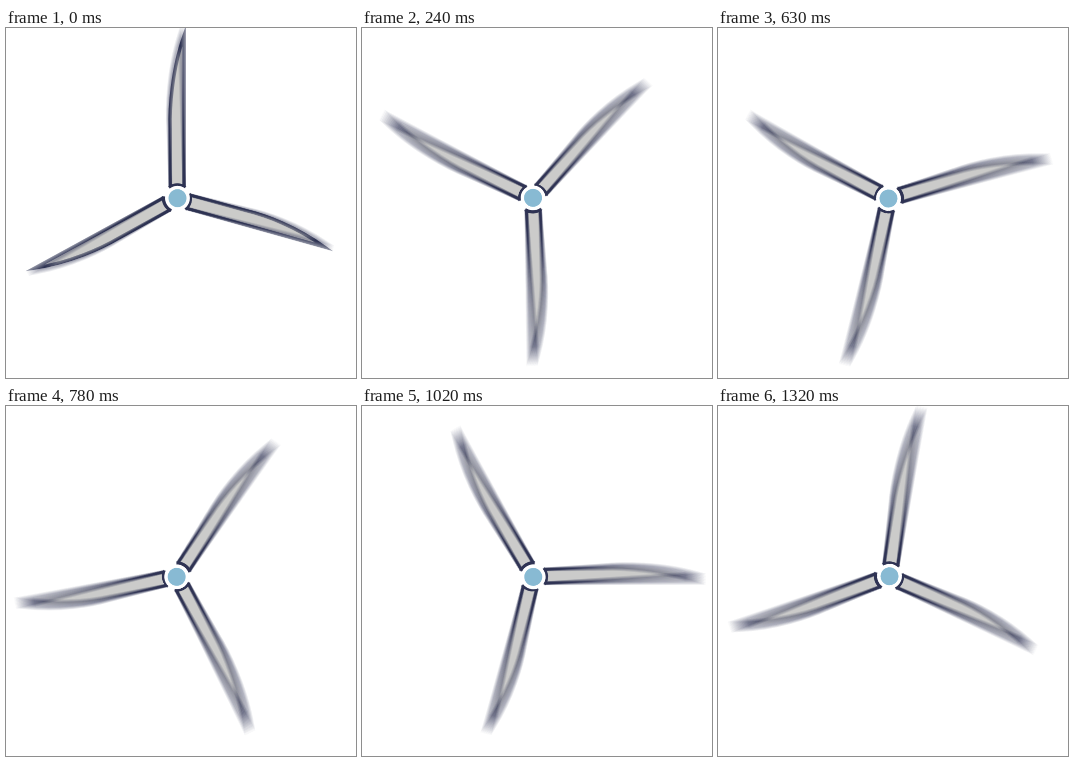
Recreate the animation shown at these times as an HTML page with a canvas. Size 350 px wide and 350 px high, loop 1350 ms.

```html
<!DOCTYPE html>
<html lang="en">
<head>
<meta charset="utf-8">
<title>Spinning rotor</title>
<style>
  html, body { margin: 0; width: 100%; height: 100%; overflow: hidden; background: #fff; }
  canvas { display: block; }
</style>
</head>
<body>
<canvas id="stage" width="350" height="350"></canvas>
<script>
const PIVOT = [171, 170.4];
const STEP_MS = 30, STEPS = 45, TURN = -360 / STEPS;
const SAMPLES = 16, SHUTTER = 0.5;
const HALF = 260, SCALE = 2;
const BLADES = [
  { angle: 0, length: 163 },
  { angle: 105.6, length: 155 },
  { angle: 241.3, length: 158 }
];
const INK = '#2b3050', METAL = '#c8c8c6', BLUE = '#85b7d0';
const rad = deg => deg * Math.PI / 180;

function disc(g, radius, color) {
  g.fillStyle = color;
  g.beginPath();
  g.arc(0, 0, radius, 0, 7);
  g.fill();
}

function drawBlade(g, { angle, length }) {
  g.save();
  g.rotate(rad(angle));
  g.beginPath();
  g.moveTo(-6.6, -12);
  g.lineTo(-6.8, -70);
  g.bezierCurveTo(-7.5, -90, -5, -length * 0.79, 7.2, -length);
  g.lineTo(7.2, -12);
  g.fillStyle = METAL;
  g.fill();
  g.stroke();
  g.beginPath();
  g.arc(0.3, 0, 13.4, rad(-127), rad(-53));
  g.stroke();
  g.restore();
}

// The rotor is drawn once on an opaque sheet so exposures can be averaged.
function makeRotor() {
  const sheet = document.createElement('canvas');
  sheet.width = sheet.height = 2 * HALF * SCALE;
  const g = sheet.getContext('2d');
  g.fillStyle = '#fff';
  g.fillRect(0, 0, sheet.width, sheet.height);
  g.scale(SCALE, SCALE);
  g.translate(HALF, HALF);
  g.strokeStyle = INK;
  g.lineWidth = 3.4;
  g.miterLimit = 20;
  BLADES.forEach(blade => drawBlade(g, blade));
  g.translate(0.5, -0.2);
  disc(g, 12.4, '#fff');
  disc(g, 9, BLUE);
  return sheet;
}

const ctx = document.getElementById('stage').getContext('2d');
const rotor = makeRotor();

function draw(now) {
  const step = Math.floor((now + 0.5) / STEP_MS) % STEPS;
  for (let i = 0; i < SAMPLES; i++) {
    const offset = ((i + 0.5) / SAMPLES - 0.5) * SHUTTER;
    // The rotor is at rest before the loop begins.
    const turn = Math.max(0, step + offset) * TURN;
    ctx.save();
    ctx.globalAlpha = 1 / (i + 1);
    ctx.translate(...PIVOT);
    ctx.rotate(rad(turn));
    ctx.drawImage(rotor, -HALF, -HALF, 2 * HALF, 2 * HALF);
    ctx.restore();
  }
  requestAnimationFrame(draw);
}
draw(0);
</script>
</body>
</html>
```
